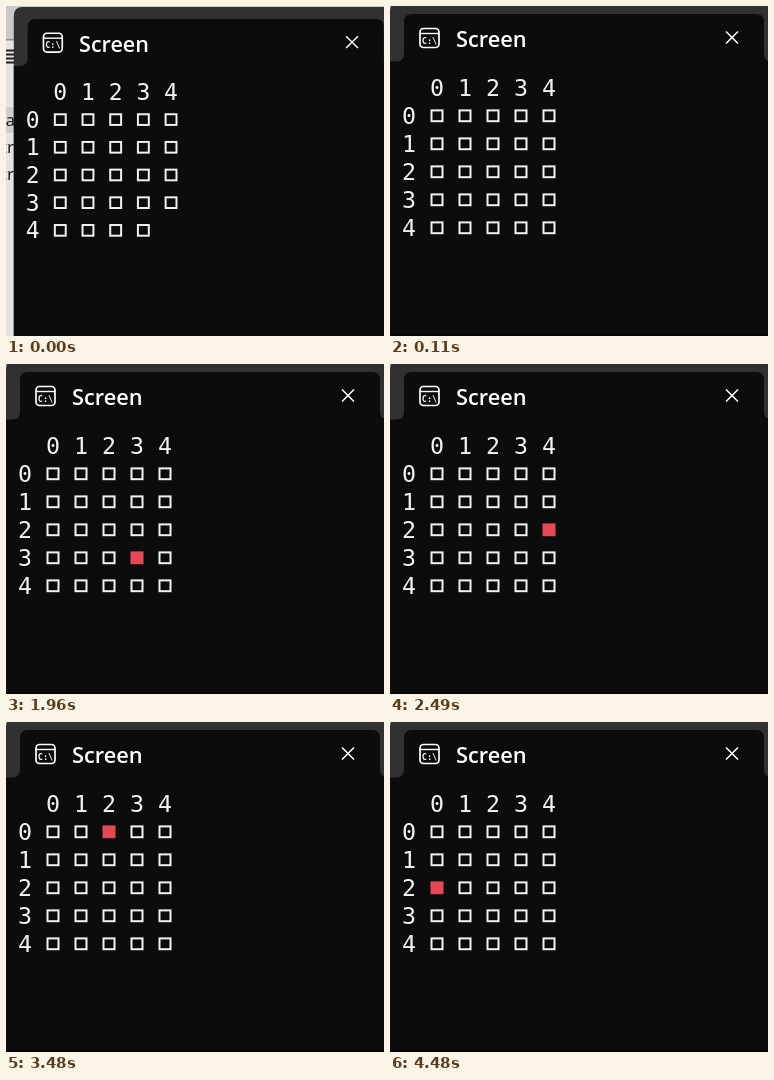
Recreate the animation shown at these times as an HTML page. Size 378 by 330 pixels, loop 4810 ms.

```html
<!DOCTYPE html>
<html lang="en">
<head>
<meta charset="utf-8">
<title>Screen</title>
<style>
  html, body { margin: 0; width: 100%; height: 100%; overflow: hidden; background: #0c0c0c; }
  svg { display: block; width: 378px; height: 330px; }
  .mono { font: 23.3px "DejaVu Sans Mono", monospace; fill: #f2f2f2; text-anchor: middle; }
  .title { font: 600 21.8px "Open Sans", "Noto Sans", sans-serif; fill: #fff; }
  .prompt { font: 700 8.5px "DejaVu Sans Mono", monospace; fill: #fff; text-anchor: middle; }
  .page { font: 17px "Noto Sans", sans-serif; fill: #222; text-anchor: end; }
</style>
</head>
<body>
<svg viewBox="0 0 378 330">
  <!-- page behind the window -->
  <rect width="378" height="330" fill="#e4e4e4"/>
  <rect width="378" height="33" fill="#c9c9c9"/>
  <rect y="33" width="378" height="1.5" fill="#8f8f8f"/>
  <g id="page">
    <rect y="101" width="9" height="26" fill="#cfcfcf"/>
    <path d="M0 44.5H8M0 48.5H8M0 52.5H8M0 56.5H8" stroke="#222" stroke-width="2"/>
    <g class="page">
      <text x="9" y="120">na</text>
      <text x="8" y="147">tr</text>
      <text x="8" y="174">tr</text>
    </g>
  </g>
  <g id="win">
    <path d="M0 340V5Q0 -4 9 -4H400V340Z" fill="#313131"/>
    <path d="M0 55.5H6Q14 55.5 14 47.5V16Q14 8 22 8H366Q374 8 374 16V47.5Q374 55.5 382 55.5H400V340H0Z" fill="#0c0c0c"/>
    <rect y="328" width="400" height="2" fill="#070405"/>
    <g fill="none" stroke="#fff">
      <rect x="30" y="22.5" width="19" height="19" rx="3.5" stroke-width="1.7"/>
      <path d="M30 27.5H49" stroke-width="1.4"/>
      <path d="M336 25.5L348 37.5M348 25.5L336 37.5" stroke-width="1.5"/>
    </g>
    <text class="prompt" x="39.5" y="37.8">C:\</text>
    <text class="title" x="66" y="41">Screen</text>
    <g id="grid"></g>
  </g>
</svg>
<script>
  const SIZE = 5, PITCH = 28, LOOP = 4810;
  const RED = '#e74856', WHITE = '#f2f2f2';
  const $ = id => document.getElementById(id);
  const grid = $('grid');

  // start time, shift x, shift y, scale of the window
  const poses = [
    [0, 7.8, 5, 0.989],
    [50, 1.2, 0.7, 0.998],
    [110, 0, 0, 1]
  ];
  // start time, column, row of the red cell
  const walk = [
    [440, 0, 2], [970, 1, 3], [1430, 2, 4], [1960, 3, 3], [2490, 4, 2],
    [2950, 3, 1], [3480, 2, 0], [4010, 1, 1], [4480, 0, 2]
  ];

  function add(tag, attrs, text = '') {
    const el = document.createElementNS('http://www.w3.org/2000/svg', tag);
    for (const key in attrs) el.setAttribute(key, attrs[key]);
    el.textContent = text;
    return grid.appendChild(el);
  }

  const cells = [];
  for (let i = 0; i < SIZE; i++) {
    add('text', { class: 'mono', x: 47 + PITCH * i, y: 90 }, i);
    add('text', { class: 'mono', x: 19, y: 118 + PITCH * i }, i);
    for (let col = 0; col < SIZE; col++) {
      cells.push(add('rect', {
        x: 41.5 + PITCH * col, y: 104.4 + PITCH * i,
        width: 11, height: 10.8, 'stroke-width': 2
      }));
    }
  }

  const current = (steps, t) => steps.filter(s => s[0] <= t).pop();

  function draw(t) {
    const [start, x, y, scale] = current(poses, t);
    $('win').setAttribute('transform', `translate(${x} ${y}) scale(${scale})`);
    $('page').style.display = start === 0 ? '' : 'none';

    const step = current(walk, t);
    const active = step ? step[2] * SIZE + step[1] : -1;
    cells.forEach((cell, i) => {
      cell.setAttribute('fill', i === active ? RED : 'none');
      cell.setAttribute('stroke', i === active ? RED : WHITE);
    });
    // the last cell is still missing at the very start
    cells[cells.length - 1].style.display = start === 0 ? 'none' : '';
  }

  const begin = performance.now();
  function tick() {
    draw((performance.now() - begin) % LOOP);
    requestAnimationFrame(tick);
  }
  draw(0);
  requestAnimationFrame(tick);
</script>
</body>
</html>
```
